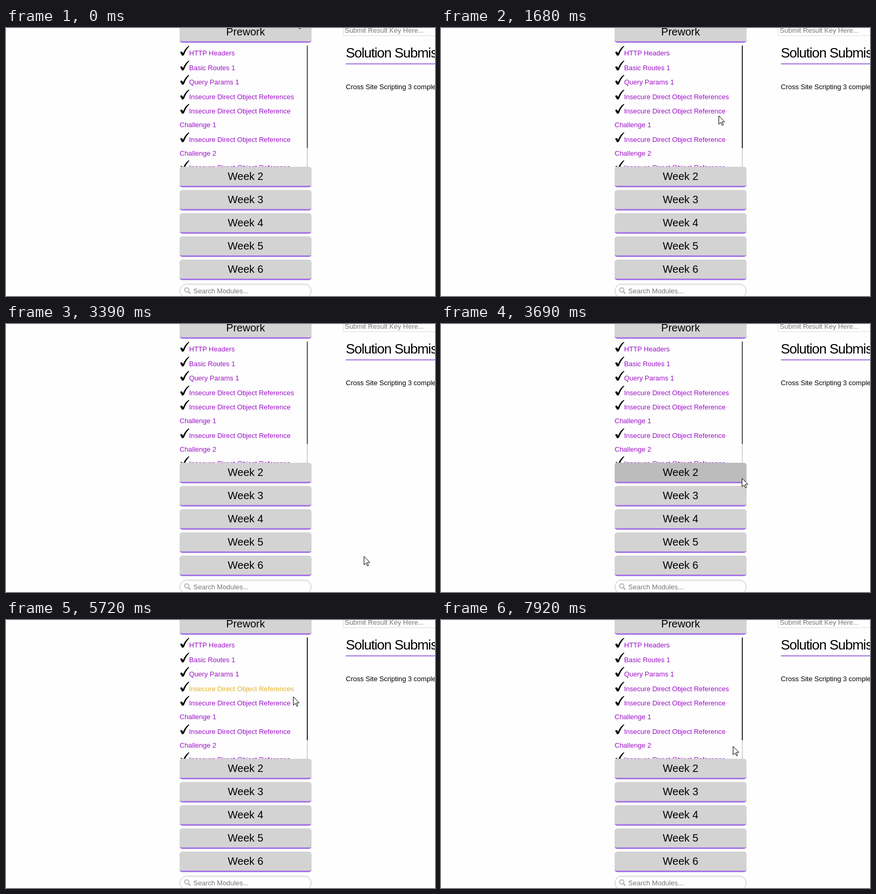
Write an HTML page that moves like this. It is 813 px wide and 508 px high and loops after 8 s.

```html
<!DOCTYPE html>
<html lang="en">
<head>
<meta charset="utf-8">
<title>Course modules</title>
<style>
  html, body { margin: 0; width: 100%; height: 100%; overflow: hidden; background: #fefefe; }
  body { position: relative; color: #000; font: 13px/15px "Liberation Sans", Arial, sans-serif; }
  body *, #list * { box-sizing: border-box; }
  .at { position: absolute; white-space: pre; }
  #list { position: absolute; left: 0; top: 0; width: 569px; height: 263px; overflow: hidden; }
  .link { color: #9c12c6; }
  .link.active { color: #e2b32c; }
  .week {
    position: absolute; left: 329px; width: 250px; height: 39px; padding-top: 7px;
    border-bottom: 3px solid #a678e4; border-radius: 5px; background: #d3d3d3;
    font-size: 20px; line-height: 22px; text-align: center;
  }
  .week.hover { background: #bcbcbc; }
  .rail, .bar { position: absolute; left: 570px; width: 2px; background: #000; }
  .rail { top: 33px; height: 230px; opacity: .16; }
  .bar { top: 33px; height: 195px; border-radius: 1px; }
  .hint { color: #777; }
  .search { left: 329px; top: 485px; width: 250px; height: 27px; border: 1px solid #bbb; border-radius: 14px; }
  .key { left: 639px; top: -14px; width: 200px; height: 29px; border: 1px solid #ddd; }
  h1 { margin: 0; left: 644px; top: 32px; font: 26px/30px "Liberation Sans", Arial, sans-serif; letter-spacing: -1px; }
  .rule { left: 644px; top: 67px; width: 200px; height: 2px; background: #a678e4; }
  #ghost { left: 347px; top: 123px; color: #c9ad55; opacity: .75; }
  svg { position: absolute; overflow: visible; }
  #pointer { left: 0; top: 0; width: 1px; height: 1px; }
</style>
</head>
<body>
<div id="list"></div>
<div class="rail"></div><div class="bar" id="bar"></div>
<div id="weeks"></div>

<div class="at search"></div>
<svg style="left:337px;top:491px" width="14" height="14" fill="none" stroke="#b8b8b8" stroke-width="2">
  <circle cx="5.5" cy="5.5" r="4"/><path d="M8.5 8.5L12.5 12.5" stroke-width="2.6"/>
</svg>
<div class="at hint" style="left:355px;top:491px">Search Modules...</div>

<div class="at key"></div>
<div class="at hint" style="left:642px;top:-3px">Submit Result Key Here...</div>
<h1 class="at">Solution Submissions</h1>
<div class="at rule"></div>
<div class="at" style="left:644px;top:104px">Cross Site Scripting 3 completed</div>

<div class="at" id="ghost">Insecure Direct Object References</div>
<svg id="pointer">
  <path id="arrow" d="M.5.5V16.5L4.4 13 7 18.6 9.2 17.6 6.6 12H11.6Z" fill="#fff" stroke="#000"/>
  <path id="hand" d="M-1.5 12V1.5Q0-.8 1.5 1.5V7Q3.5 5.5 4.5 7.5 6.5 6.5 7.5 8.5 10.5 7.5 10.5 10V15L8.5 18.5V21.5H-1V19L-5.5 13Q-6-9 -5.5 11 -4 9.5-1.5 12Z" fill="#fff" stroke="#000"/>
  <g id="nodrop" fill="none">
    <circle r="7.7" fill="#fff" stroke="#000" stroke-width="2.2"/>
    <path d="M-5.5-5.5L5.5 5.5" stroke="#000" stroke-width="2.4"/>
  </g>
</svg>

<script>
const LOOP = 8000;
const $ = id => document.getElementById(id);

// Module list: vertical centre, text, wrapped continuation
const rows = [
  [47, 'HTTP Headers'], [75, 'Basic Routes 1'], [102, 'Query Params 1'],
  [130, 'Insecure Direct Object References'],
  [157, 'Insecure Direct Object Reference', 'Challenge 1'],
  [211, 'Insecure Direct Object Reference', 'Challenge 2'],
  [264, 'Insecure Direct Object Reference']
];
const check = y => `<svg style="left:329px;top:${y - 13}px" width="19" height="19">
  <path d="M1 12Q3.6 9.2 5.2 11.5L6.4 14Q10.5 4.5 17 0L18.6.6Q12 7 8.4 17Q6.6 19 4.6 18.4Z"/></svg>`;
const link = (x, y, text) => `<div class="at link" style="left:${x}px;top:${y - 7}px">${text}</div>`;
$('list').innerHTML = rows.map(([y, text, more]) =>
  check(y) + link(347, y, text) + (more ? link(329, y + 26, more) : '')).join('');

$('weeks').innerHTML = ['Prework', 'Week 2', 'Week 3', 'Week 4', 'Week 5', 'Week 6'].map((name, i) =>
  `<div class="week" style="top:${i ? 219 + 44 * i : -11}px">${name}</div>`).join('');

const weeks = [...document.querySelectorAll('.week')];
const dragged = document.querySelectorAll('.link')[3];

// Pointer strokes: start time, step length, positions
const strokes = [
  [0, 1, [[549, -17]]],
  [590, 130, [[549, 3], [547, 62], [545, 119], [537, 148], [530, 160], [527, 165]]],
  [1680, 1, [[526, 166]]],
  [2140, 135, [[568, 362], [616, 412], [660, 452], [705, 480], [721, 488]]],
  [3390, 144, [[678, 440], [622, 385], [570, 292], [556, 205], [546, 152], [541, 138]]],
  [4760, 137, [[540, 147], [541, 157], [543, 166], [546, 172], [546, 170], [545, 163], [544, 152], [544, 145]]],
  [5870, 133, [[545, 146], [550, 155], [558, 178], [565, 205], [567, 228], [564, 242], [558, 246], [555, 243]]],
  [7080, 140, [[554, 242], [551, 241], [548, 240], [547, 241], [546, 241]]],
  [7920, 1, [[553, 239]]]
];
const hovers = [[590, 720, 0], [2140, 2410, 3], [3678, 3822, 1]];
const barShade = [[0, .6], [850, .7], [1010, .8], [2140, .76], [2290, .72], [2410, .6], [3822, .7], [3966, .8]];

const latest = (list, t) => list.filter(([start]) => start <= t).pop();
const show = (node, on) => { node.style.display = on ? '' : 'none'; };

function draw(t) {
  const [start, step, path] = latest(strokes, t);
  const [x, y] = path[Math.min(path.length - 1, Math.floor((t - start) / step))];
  const dragging = t >= 4760 && t < 5719;
  const pointing = t >= 4110 && t < 4760;

  $('pointer').style.transform = `translate(${x}px, ${y}px)`;
  show($('arrow'), !dragging && !pointing);
  show($('hand'), pointing);
  show($('nodrop'), dragging);
  show($('ghost'), dragging);
  $('ghost').style.transform = `translate(${x - 541}px, ${y - 139}px)`;

  dragged.classList.toggle('active', t >= 4110 && t < 5870);
  weeks.forEach((week, i) => week.classList.toggle('hover',
    hovers.some(([from, to, index]) => index === i && t >= from && t < to)));
  $('bar').style.opacity = latest(barShade, t)[1];
}

const begin = performance.now();
function tick() {
  draw((performance.now() - begin) % LOOP);
  requestAnimationFrame(tick);
}
tick();
</script>
</body>
</html>
```
